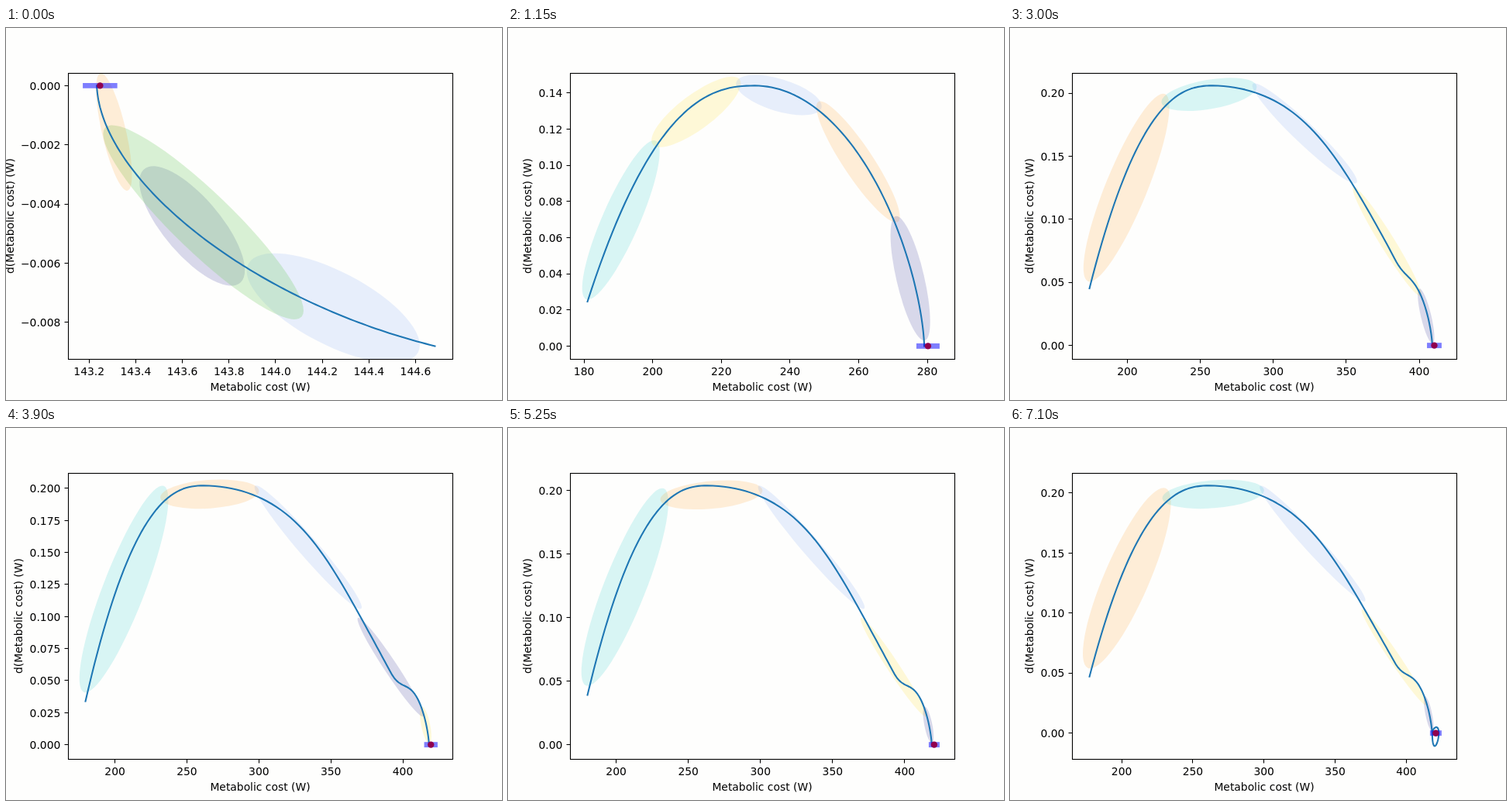
Animation of 640 by 480 pixels, one loop 7150 ms. Source, as an HTML page:

```html
<!DOCTYPE html>
<html lang="en">
<head>
<meta charset="utf-8">
<title>Metabolic cost phase plot</title>
<style>
html, body { margin: 0; width: 100%; height: 100%; overflow: hidden; background: #fefefd; }
svg { display: block; width: 640px; height: 480px; }
text { font: 13.89px "DejaVu Sans", sans-serif; fill: #000; }
</style>
</head>
<body>
<svg viewBox="0 0 640 480">
  <clipPath id="area"><rect x="80" y="57.6" width="496" height="369.6"/></clipPath>
  <g clip-path="url(#area)">
    <g id="ellipses" fill-opacity=".15"></g>
    <path id="curve" fill="none" stroke="#1f77b4" stroke-width="2.08" stroke-linejoin="round" stroke-linecap="square"/>
  </g>
  <path id="bar" stroke="#00f" stroke-opacity=".5" stroke-width="6.94" stroke-linecap="square"/>
  <circle id="dot" r="4.2" fill="#90004e"/>
  <g id="ticks"></g>
  <rect x="80.5" y="58.5" width="496" height="369" fill="none" stroke="#000" stroke-width="1.1"/>
  <text x="328" y="467.8" text-anchor="middle">Metabolic cost (W)</text>
  <text id="yLabel" text-anchor="middle">d(Metabolic cost) (W)</text>
</svg>
<script>
const LOOP = 7150, STEP = 50;
const RISE = 40, FALL = 80, TAIL = 40, MAIN = RISE + FALL;
const NAVY = 'navy', CYAN = '#00bfbf', BLUE = 'cornflowerblue', GOLD = 'gold', ORANGE = 'darkorange';

const $ = id => document.getElementById(id);
const lerp = (a, b, t) => Array.isArray(a) ? a.map((v, i) => lerp(v, b[i], t)) : a + (b - a) * t;
const range = (n, fn) => Array.from({ length: n }, (_, i) => fn(i));
const chain = breaks => breaks.slice(1).map((b, i) => [breaks[i], b]);
const EARLY = chain([0, .2, .45, .685, .915, 1]);
const LATE = chain([0, .22, .5, .8, .98, 1]);

// A power-law rise to the peak, a rounded fall with an optional dip, then a damped loop
function arch({ start, peak, end, dip = 0, turn = 0, swing = 0, radius = 0 }) {
  const rise = range(RISE, i => {
    const t = i / RISE;
    return [lerp(start[0], peak[0], t), peak[1] - (peak[1] - start[1]) * (1 - t) ** 2.4];
  });
  const fall = range(FALL, i => {
    const t = 1 - (1 - i / (FALL - 1)) ** 2;
    const sag = dip * Math.exp(-(((t - .83) / (t < .83 ? .31 : .1)) ** 2)) * (t < 1);
    return [lerp(peak[0], end, t), peak[1] * ((1 - t * t) ** .65 - sag)];
  });
  const tail = range(TAIL, i => {
    const a = turn * i / (TAIL - 1);
    return [end + radius * (1 - Math.cos(a)), -swing * Math.sin(a) * Math.exp(-a / 4)];
  });
  return [...rise, ...fall, ...tail];
}

// A decaying start: one cubic Bezier, walked from its far end to rest
function decay(from, to) {
  return range(MAIN + TAIL, i => {
    const t = Math.max(0, 1 - i / (MAIN - 1)), s = 1 - t;
    const bezier = (b, c) => 3 * s * s * t * b + 3 * s * t * t * c + t ** 3;
    return [lerp(to[0], from[0], bezier(.011, .454)), lerp(to[1], from[1], bezier(.36, .826))];
  });
}

// bar: centre and half length. width: first half width of the ellipses and its ratio.
const poses = [
  { time: 0, curve: decay([144.683, -.0088], [143.233, 0]), bar: [143.247, .0625],
    width: [52, 1], lean: 1, spans: [[.05, .55], [.57, .865], [.4, .97], [.4, .97], [.9, 1]],
    colors: [BLUE, NAVY, GOLD, CYAN, ORANGE] },
  { time: 1150, curve: arch({ start: [181, .0246], peak: [229.7, .1441], end: 279.1 }),
    bar: [280.2, 2.6], width: [24, .93], lean: 0, spans: EARLY,
    colors: [CYAN, GOLD, BLUE, ORANGE, NAVY] },
  { time: 2150, curve: arch({ start: [158.9, .0769], peak: [249.5, .2165], end: 383.2 }),
    bar: [384.8, 4.2], width: [26, .78], lean: 0, spans: EARLY, ease: t => 1 - (1 - t) ** 2,
    colors: [ORANGE, CYAN, BLUE, GOLD, NAVY] },
  { time: 3900, curve: arch({ start: [179.5, .0339], peak: [261.6, .2022], end: 418.3, dip: .19 }),
    bar: [419.5, 2.8], width: [27, .68], lean: 0, spans: LATE,
    colors: [CYAN, ORANGE, BLUE, NAVY, GOLD] },
  { time: 5250, curve: arch({ start: [180.1, .0391], peak: [263.1, .204], end: 418.8, dip: .19, turn: Math.PI, radius: .8 }),
    bar: [420.4, 1.9], width: [27, .66], lean: 0, spans: LATE,
    colors: [CYAN, ORANGE, BLUE, GOLD, NAVY] },
  { time: 6450, curve: arch({ start: [189.8, .0179], peak: [268.3, .1977], end: 418.5, dip: .18, turn: Math.PI, swing: -.009, radius: 3.1 }),
    bar: [422.4, 2.6], width: [27, .66], lean: 0, spans: LATE,
    colors: [ORANGE, CYAN, BLUE, GOLD, NAVY] },
  { time: 7100, curve: arch({ start: [177.4, .0471], peak: [261.5, .2062], end: 418.2, dip: .18, turn: 2 * Math.PI, swing: .0155, radius: 2.3 }),
    bar: [420.7, 2.2], width: [29, .62], lean: 0, spans: LATE,
    colors: [ORANGE, CYAN, BLUE, GOLD, NAVY] }
];

function poseAt(time) {
  const next = Math.max(1, poses.findIndex(p => p.time >= time));
  const a = poses[next - 1], b = poses[next];
  const linear = (time - a.time) / (b.time - a.time);
  const t = a.ease ? a.ease(linear) : linear;
  const pose = { colors: (linear < .5 ? a : b).colors };
  for (const key of ['curve', 'bar', 'width', 'lean', 'spans']) pose[key] = lerp(a[key], b[key], t);
  return pose;
}

// Limits with 5% margins, and tick positions for at most nine intervals
function makeAxis(values, start, length) {
  const low = Math.min(...values), high = Math.max(...values);
  const min = low - (high - low) * .05, size = (high - low) * 1.1, raw = size / 9;
  const power = Math.floor(Math.log10(raw));
  const factor = [1, 2, 2.5, 5, 10].find(f => f * 10 ** power >= raw);
  const step = factor * 10 ** power;
  const digits = Math.max(0, factor === 10 ? -power - 1 : factor === 2.5 ? 1 - power : -power);
  const pixel = v => start + (v - min) / size * length;
  const ticks = [];
  for (let n = Math.ceil(min / step); n * step <= min + size; n++) {
    const sign = n < 0 ? '\u2212' : '';
    ticks.push({ at: pixel(n * step), label: sign + Math.abs(n * step).toFixed(digits) });
  }
  return { pixel, ticks };
}

// One ellipse along the chord of a span of the curve, pulled towards its middle
function ellipse(main, [from, to], half, lean, color) {
  const first = main[0][0], last = main[main.length - 1][0];
  const at = f => {
    const x = lerp(first, last, f);
    return main.reduce((best, p) => Math.abs(p[0] - x) < Math.abs(best[0] - x) ? p : best);
  };
  const [x0, y0] = at(from), [x1, y1] = at(to), middle = at((from + to) / 2);
  const dx = (x1 - x0) / 2, dy = (y1 - y0) / 2, length = Math.hypot(dx, dy) || 1;
  const cx = (x0 + x1) / 2, cy = lerp((y0 + y1) / 2, middle[1], .4);
  const nx = -dy / length * half * (1 - lean);
  const ny = lerp(dx / length, Math.sign(dx), lean) * half;
  const matrix = [dx * 1.04, dy * 1.04, nx, ny, cx, cy].map(v => v.toFixed(3));
  return `<circle r="1" fill="${color}" transform="matrix(${matrix})"/>`;
}

const textWidth = s => [...s].reduce((w, c) => w + (c === '.' ? 4.41 : c === '\u2212' ? 11.64 : 8.84), 0);
const snap = v => Math.floor(v) + .5;

function draw(time) {
  const { curve, bar: [value, spread], width: [half, ratio], lean, spans, colors } = poseAt(time);
  const x = makeAxis([...curve.map(p => p[0]), value - spread, value + spread], 80, 496);
  const y = makeAxis([...curve.map(p => p[1]), 0], 427.2, -369.6);
  const points = curve.map(p => [x.pixel(p[0]), y.pixel(p[1])]);
  const main = points.slice(0, MAIN), zero = y.pixel(0);

  $('ellipses').innerHTML = spans.map((s, i) => ellipse(main, s, half * ratio ** i, lean, colors[i])).join('');
  $('curve').setAttribute('d', 'M' + points.map(p => p.map(v => v.toFixed(2))).join('L'));
  $('bar').setAttribute('d', `M${x.pixel(value - spread)},${zero}H${x.pixel(value + spread)}`);
  $('dot').setAttribute('cx', x.pixel(value));
  $('dot').setAttribute('cy', zero);

  const tick = (d, tx, ty, anchor, label) =>
    `<path d="${d}" stroke="#000" stroke-width="1.1"/><text x="${tx}" y="${ty}" text-anchor="${anchor}">${label}</text>`;
  $('ticks').innerHTML =
    x.ticks.map(t => tick(`M${snap(t.at)},427.5v5`, t.at, 447.6, 'middle', t.label)).join('') +
    y.ticks.map(t => tick(`M80.5,${snap(t.at)}h-5`, 70.3, t.at + 5.2, 'end', t.label)).join('');

  const widest = Math.max(...y.ticks.map(t => textWidth(t.label)));
  $('yLabel').setAttribute('transform', `translate(${61.2 - widest},242.6) rotate(-90)`);
}

let shown = -1;
const began = performance.now();
function frame() {
  const step = Math.floor((performance.now() - began) % LOOP / STEP);
  if (step !== shown) draw((shown = step) * STEP);
  requestAnimationFrame(frame);
}
frame();
</script>
</body>
</html>
```
